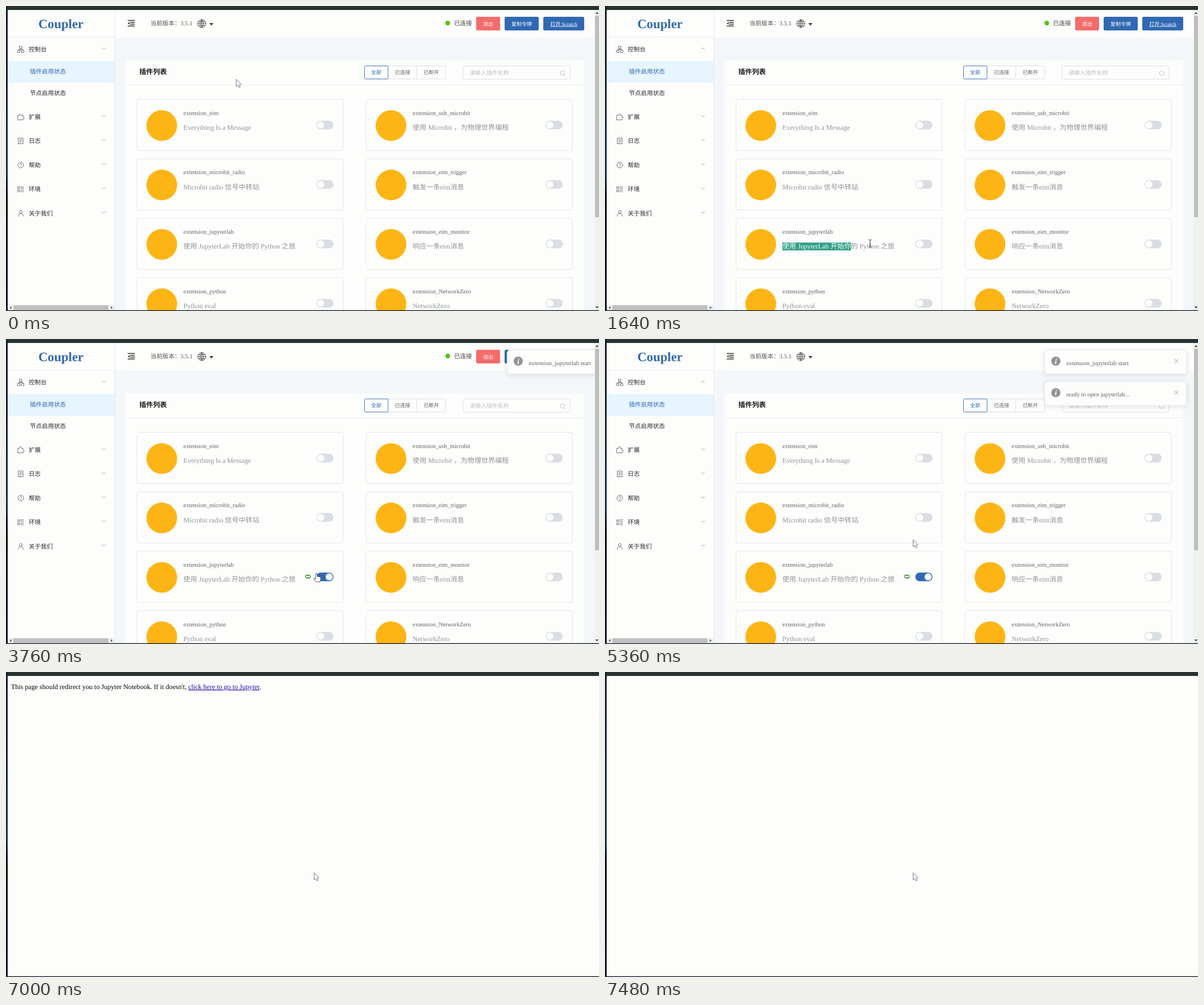
Animation of 1043 by 537 pixels, one loop 8 s. Source, as an HTML page:

```html
<!DOCTYPE html>
<html lang="zh-CN">
<head>
<meta charset="utf-8">
<title>Plugin list</title>
<style>
  html, body { margin: 0; width: 100%; height: 100%; overflow: hidden; background: #fdfdfb; }
  svg { display: block; width: 100%; height: 100%; }
  text {
    font-family: "Liberation Serif", "Noto Sans CJK SC", "Noto Sans CJK", serif;
    text-rendering: geometricPrecision;
    white-space: pre;
  }
  .line { fill: none; stroke-linecap: round; stroke-linejoin: round; }
</style>
</head>
<body>
<svg id="stage" viewBox="0 0 1043 537" xmlns="http://www.w3.org/2000/svg"></svg>
<script>
const LOOP = 8000;
const PAPER = '#fdfdfb', BLUE = '#3069b2', GREY = '#909399';
const SMALL = 9.06, BODY = 10.57, LARGE = 12.08;

const rect = (x, y, w, h, fill, extra = '') =>
  `<rect x="${x}" y="${y}" width="${w}" height="${h}" fill="${fill}" ${extra}/>`;
const circle = (x, y, r, fill, extra = '') =>
  `<circle cx="${x}" cy="${y}" r="${r}" fill="${fill}" ${extra}/>`;
const text = (x, y, size, fill, content, extra = '') =>
  `<text x="${x}" y="${y}" font-size="${size}" fill="${fill}" ${extra}>${content}</text>`;
const line = (d, stroke, width = 1, extra = '') =>
  `<path class="line" d="${d}" stroke="${stroke}" stroke-width="${width}" ${extra}/>`;
const group = (content, extra) => `<g ${extra}>${content}</g>`;
const at = (x, y, content) => group(content, `transform="translate(${x} ${y})"`);

// Icons are drawn around their own centre.
const menuIcons = {
  cluster: 'M-2-5.5h4v4h-4zM-5.5 1.5h4v4h-4zM1.5 1.5h4v4h-4zM0-1.5v1.5M-3.5 1.5V0h7v1.5',
  puzzle: 'M-5-3h3v-1.2a1.5 1.5 0 0 1 3 0V-3h3v3h.6a1.4 1.4 0 0 1 0 2.8H4V5h-9z',
  page: 'M-4-5h8v10h-8zM-2-2h4M-2 .3h4M-2 2.5h2',
  help: 'M5 0A5 5 0 1 1-5 0 5 5 0 0 1 5 0M-1.6-1.2a1.6 1.6 0 1 1 2.4 1.4Q0 .6 0 1.4M0 3v.1',
  list: 'M-5-4h3v3h-3zM-5 1.5h3v3h-3zM0-4h5M0-1.3h5M0 1.6h5M0 4.4h5',
  user: 'M2.5-2.3a2.5 2.5 0 1 1-5 0 2.5 2.5 0 0 1 5 0M-4.5 5a4.5 4.5 0 0 1 9 0'
};

function sidebar() {
  const items = [
    ['cluster', '控制台', 76], ['puzzle', '扩展', 195], ['page', '日志', 237],
    ['help', '帮助', 279.5], ['list', '环境', 322], ['user', '关于我们', 364.5]
  ];
  return rect(3, 7, 188, 529, PAPER) +
    text(57, 39, 22.65, '#3167ad', 'Coupler', 'font-weight="700"') +
    rect(3, 54.5, 188, 1, '#e6e9ee') +
    rect(3, 97, 188, 38, '#e6f5fe') +
    text(42, 119, BODY, BLUE, '插件启用状态') +
    text(42, 157, BODY, '#26282b', '节点启用状态') +
    items.map(([icon, label, y], i) =>
      at(26, y + .5, line(menuIcons[icon], '#606468', .9)) +
      text(40, y + 4, BODY, '#26282b', label) +
      at(172, y - 1, line(i ? 'M-3-1.5 0 1.5 3-1.5' : 'M-3 1.5 0-1.5 3 1.5', GREY, .8))
    ).join('') +
    rect(191, 7, 1, 529, '#e3e6eb') +
    rect(3, 526, 188, 10, '#f1f1ef') + rect(13, 527, 167, 8, '#bfbfbf') +
    '<path d="M9.5 528.5v5l-3-2.5zM184.5 528.5v5l3-2.5z" fill="#505050"/>';
}

function header() {
  const button = (x, w, fill, label, extra = '') =>
    rect(x, 19, w, 24, fill, 'rx="2.5"') +
    text(x + w / 2, 34.5, SMALL, '#fff', label, `text-anchor="middle" ${extra}`);
  return rect(192, 7, 843, 49, PAPER) +
    line('M214.5 25.5h11.5M219 28.8h7M219 32h7M214.5 35.2h11.5', '#333', 1.4) +
    '<path d="M217.4 28v5l-3.2-2.5z" fill="#333"/>' +
    text(254, 34, BODY, '#555', '当前版本：3.5.1') +
    at(344.3, 31, line('M7 0A7 7 0 1 1-7 0 7 7 0 0 1 7 0M-7 0H7M0-7V7M-6-3.6H6M-6 3.6H6M0-7Q-6.5 0 0 7Q6.5 0 0-7', '#444', .9)) +
    '<path d="M357.5 30h7.5l-3.7 4.5z" fill="#444"/>' +
    circle(777, 30, 4.2, '#52c41a') +
    text(788, 34, BODY, '#444', '已连接') +
    button(827, 42, '#f46c6c', '退出') +
    button(877, 60, BLUE, '复制令牌') +
    button(945, 72, BLUE, '打开 Scratch', 'text-decoration="underline"');
}

function listHeader() {
  const tab = (x, label, fill) => text(x, 120, SMALL, fill, label, 'text-anchor="middle"');
  return rect(210, 96, 807, 440, PAPER) +
    rect(210, 138, 807, 1, '#e9ecf1') +
    text(234.5, 120, LARGE, '#1a1a1a', '插件列表', 'font-weight="700"') +
    rect(630.5, 105.5, 143, 23, PAPER, 'rx="2.5" stroke="#dcdfe6"') +
    rect(722, 106, 1, 22, '#dcdfe6') +
    rect(630.5, 105.5, 41.5, 23, PAPER, 'rx="2" stroke="#4678b8"') +
    tab(651, '全部', BLUE) + tab(697.5, '已连接', '#606266') + tab(748, '已断开', '#606266') +
    rect(804, 105.5, 188, 23.5, PAPER, 'rx="2.5" stroke="#dcdfe6"') +
    text(815.5, 120.5, 9.82, '#bcc0c7', '请输入插件名称') +
    line('M983 118a4 4 0 1 1-8 0 4 4 0 0 1 8 0M981.9 121l1.6 1.6', '#bcc0c7', .9);
}

function cards() {
  const plugins = [
    ['extension_eim', 'Everything Is a Message'],
    ['extension_usb_microbit', '使用 Microbit ，为物理世界编程'],
    ['extension_microbit_radio', 'Microbit radio 信号中转站'],
    ['extension_eim_trigger', '触发一条eim消息'],
    ['extension_jupyterlab', '使用 JupyterLab 开始你的 Python 之旅'],
    ['extension_eim_monitor', '响应一条eim消息'],
    ['extension_python', 'Python eval'],
    ['extension_NetworkZero', 'NetworkZero']
  ];
  return plugins.map(([name, about], i) => {
    const live = name === 'extension_jupyterlab';
    return at(230.5 + (i % 2) * 403.2, 164.5 + (i >> 1) * 104.6,
      rect(0, 0, 362.5, 90, PAPER, 'rx="3" stroke="#e2e5eb"') +
      circle(43.5, 46, 27, '#fdb515') +
      text(81.5, 27.3, BODY, '#606266', name) +
      text(81.5, 53.5, LARGE, GREY, about, live ? 'id="about"' : '') +
      rect(315.3, 37.5, 30.2, 15.2, '#dadde4', `rx="7.6" ${live ? 'id="track"' : ''}`) +
      circle(322.9, 45.1, 6.2, PAPER, live ? 'id="knob"' : ''));
  }).join('') +
  `<g id="selection"><clipPath id="selectionClip"><rect id="selectionBox" x="312" y="416.5" width="0" height="13.7"/></clipPath>` +
  group(rect(312, 416, 210, 15, '#2f9f86') + text(312, 427.2, LARGE, '#fff', plugins[4][1]),
    'clip-path="url(#selectionClip)"') + '</g>' +
  group(line('M3 1.8H-2.2a2.3 2.3 0 0 1 0-4.6H1.5a2.3 2.3 0 0 1 2.3 2.3M-3-1.8H2.2a2.3 2.3 0 0 1 0 4.6H-1.5a2.3 2.3 0 0 1-2.3-2.3',
    '#43a047', 1.2), 'id="link" transform="translate(531 418.3)"');
}

const toast = (id, message) => group(
  rect(773.5, 19.5, 249, 42, PAPER, 'rx="5" stroke="#e8ebf1" filter="url(#shadow)"') +
  circle(793, 39, 8, GREY) +
  text(793, 43.7, 14, PAPER, 'i', 'text-anchor="middle" font-style="italic" font-weight="700"') +
  text(811.5, 45.8, BODY, '#606266', message) +
  line('M1001.7 35.5l6.4 6.4m0-6.4l-6.4 6.4', GREY, .9), `id="${id}"`);

const scrollbar = rect(1035, 7, 8, 529, '#f1f1f0') + rect(1036, 17, 7, 355, '#bfbfbf') +
  '<path d="M1036.5 14h6l-3-3.5zM1036.5 529h6l-3 3.5z" fill="#505050"/>';

const redirectPage = text(8.8, 30, LARGE, '#000',
  'This page should redirect you to Jupyter Notebook. If it doesn\'t, ' +
  '<tspan fill="#1a0dab" text-decoration="underline">click here to go to Jupyter</tspan>.');

const pointers = {
  arrow: '<path d="M0 0v12.5l3-2.3 2 4 2.2-1.1-1.7-3.6 2.8-.9z" fill="#fff" stroke="#5d5f72" stroke-width=".9"/>',
  beam: line('M-2.2-6.5q2.2 0 2.2 1.5v10q0 1.5-2.2 1.5M2.2-6.5Q0-6.5 0-5M0 5q0 1.5 2.2 1.5', '#555', 1.2),
  hand: '<path d="M-1.3 1q0-1.4 1.3-1.4T1.3 1v4l5 .9q1.6.4 1.5 2l-.6 3.6-1.2 3.2H-.6l-4.2-5.2q-.5-1.3 1-1.6l2.5 1.4z" fill="#fff" stroke="#444" stroke-width=".9"/>'
};

const stage = document.getElementById('stage');
stage.innerHTML = `
  <defs>
    <filter id="shadow" x="-10%" y="-40%" width="120%" height="190%">
      <feDropShadow dx="0" dy="1.5" stdDeviation="4" flood-color="#000" flood-opacity=".12"/>
    </filter>
    <linearGradient id="edge" x2="0" y2="1">
      <stop offset="0" stop-color="#181f2b"/><stop offset=".55" stop-color="#1c3048"/>
      <stop offset=".64" stop-color="#060910"/><stop offset="1" stop-color="#111a2a"/>
    </linearGradient>
  </defs>` +
  rect(3, 7, 1040, 529, PAPER, 'id="blank"') +
  group(rect(192, 56, 843, 480, '#f4f7fa') + header() + listHeader() + cards() + sidebar() +
    toast('toast1', 'extension_jupyterlab start') +
    toast('toast2', 'ready to open jupyterlab...') + scrollbar, 'id="console"') +
  group(redirectPage, 'id="redirect"') +
  rect(0, 0, 1043, 7, '#29322f') + rect(0, 6, 1043, 1, '#233b3d') +
  rect(0, 0, 3, 537, 'url(#edge)') + rect(0, 535.6, 1043, 1.4, '#1b2733') +
  Object.entries(pointers).map(([id, shape]) => group(shape, `id="${id}"`)).join('');

const el = Object.fromEntries([...stage.querySelectorAll('[id]')].map(node => [node.id, node]));
const show = (node, visible) => node.setAttribute('display', visible ? 'inline' : 'none');
const place = (node, x, y) => node.setAttribute('transform', `translate(${x} ${y})`);
const progress = (t, start, length) => Math.min(1, Math.max(0, (t - start) / length));
const easeOut = u => 1 - (1 - u) ** 2.3;

// [time, x, y] of the pointer hot spot
const path = [
  [0, 405, 129], [40, 405, 129], [400, 374, 262], [840, 322, 410], [1040, 312, 423],
  [1240, 312, 423], [1640, 466, 418], [1760, 512, 418], [2440, 518, 422],
  [2700, 526, 432], [3120, 546, 413], [3840, 546, 413], [4160, 542, 353.5], [LOOP, 542, 353.5]
];
function pointerAt(t) {
  const i = path.findIndex(step => step[0] > t);
  const [t0, x0, y0] = path[i - 1], [t1, x1, y1] = path[i];
  const u = (t - t0) / (t1 - t0);
  return [x0 + (x1 - x0) * u, y0 + (y1 - y0) * u];
}

const chars = el.about.textContent.length;
function selectionWidth(t) {
  if (t < 1240 || t >= 2440) return 0;
  const reach = t > 1850 ? 210 : pointerAt(Math.max(1240, t - 84))[0] - 312;
  let width = 0;
  for (let n = 1; n <= chars; n++) {
    const next = el.about.getSubStringLength(0, n);
    if ((width + next) / 2 > reach) break;
    width = next;
  }
  return width;
}

function render(t) {
  const dark = (t >= 5760 && t < 5880) || (t >= 7160 && t < 7320);
  el.blank.setAttribute('fill', dark ? '#2c3a41' : PAPER);
  show(el.console, t < 5760);
  show(el.redirect, t >= 5880 && t < 7160);

  el.selectionBox.setAttribute('width', selectionWidth(t));

  const on = progress(t, 3420, 240);
  el.knob.setAttribute('cx', 322.9 + 15 * easeOut(on));
  el.track.setAttribute('fill', `color-mix(in srgb, ${BLUE} ${on * 100}%, #dadde4)`);
  show(el.link, t >= 3640);

  place(el.toast1, 262 * (1 - easeOut(progress(t, 3665, 300))), 0);
  place(el.toast2, 262 * (1 - easeOut(progress(t, 3900, 300))), 55.5);
  show(el.toast1, t >= 3665);
  show(el.toast2, t >= 3900);

  const [x, y] = pointerAt(t);
  const kind = t >= 1000 && t < 2600 ? 'beam' : t >= 3080 && t < 3900 ? 'hand' : 'arrow';
  for (const id in pointers) show(el[id], id === kind);
  place(el[kind], x, y);
}

function tick() {
  render(performance.now() % LOOP);
  requestAnimationFrame(tick);
}
tick();
</script>
</body>
</html>
```
